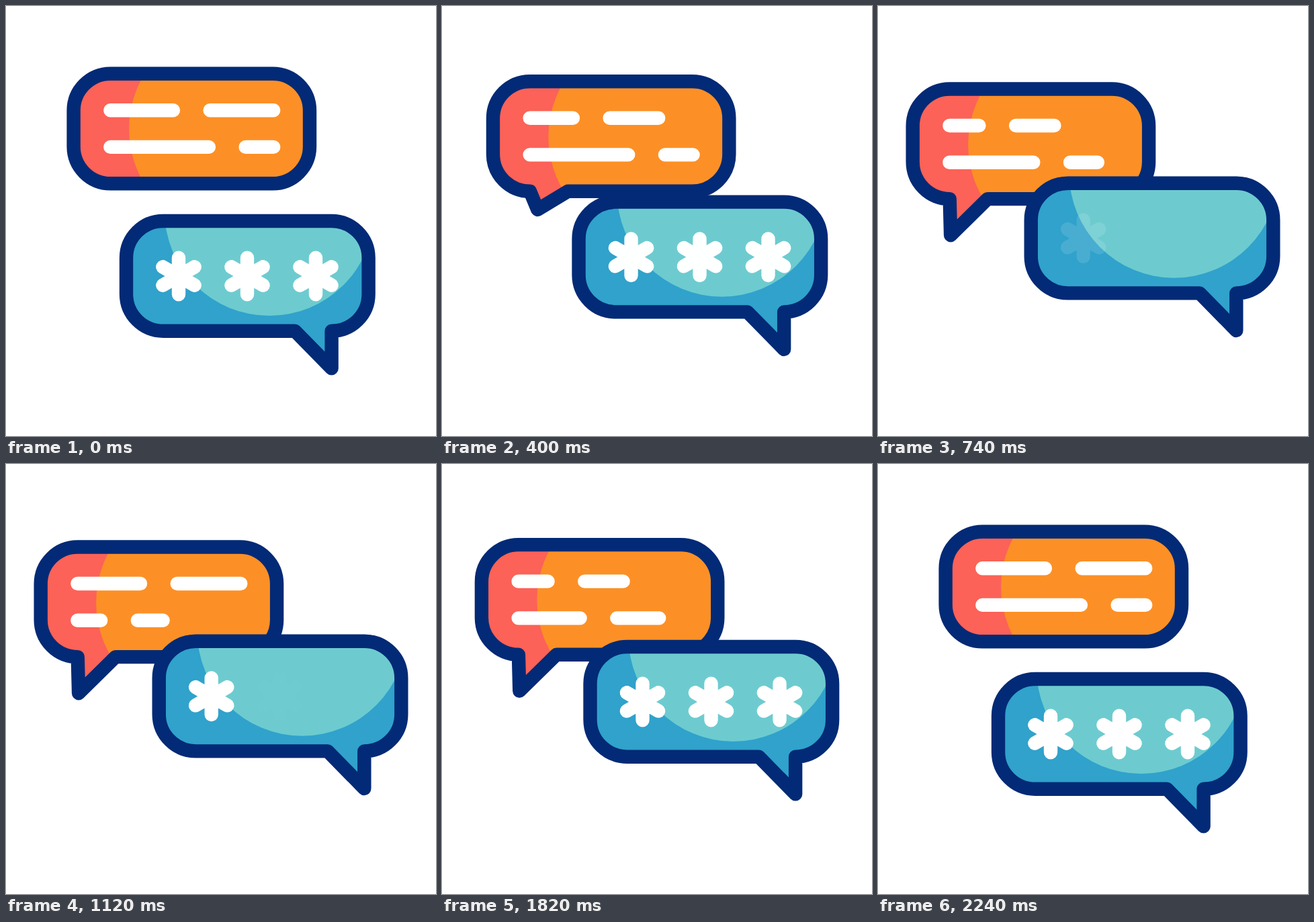
An HTML page for the animation above (2400 ms loop, 640 by 640 pixels).

```html
<!DOCTYPE html>
<html lang="en">
<head>
<meta charset="utf-8">
<title>Chat bubbles</title>
<style>
  html, body { margin: 0; width: 100%; height: 100%; overflow: hidden; background: #fff; }
  svg { display: block; width: 100vw; height: 100vh; }
  .outline { fill: none; stroke: #032a76; stroke-width: 20.4; stroke-linejoin: round; }
  .mark { fill: none; stroke: #fff; stroke-width: 20.4; stroke-linecap: round; }
</style>
</head>
<body>
<svg viewBox="0 0 640 640">
  <defs>
    <clipPath id="messageClip"><path class="messageShape"/></clipPath>
    <clipPath id="replyClip"><path class="replyShape"/></clipPath>
  </defs>
  <g id="message">
    <g clip-path="url(#messageClip)">
      <rect x="90" y="90" width="380" height="250" fill="#fc6257"/>
      <path d="M340 26H480V340H340A157 157 0 0 1 340 26Z" fill="#fc9026"/>
    </g>
    <path class="outline messageShape"/>
    <path class="mark" id="row1"/>
    <path class="mark" id="row2"/>
  </g>
  <g id="reply">
    <g clip-path="url(#replyClip)">
      <rect x="160" y="300" width="400" height="260" fill="#30a2cb"/>
      <circle cx="392" cy="305" r="156" fill="#6dcbcf"/>
    </g>
    <path class="outline replyShape"/>
    <g id="stars"></g>
  </g>
</svg>
<script>
const LOOP = 2400;
const $ = id => document.getElementById(id);
const setPath = (selector, d) =>
  document.querySelectorAll(selector).forEach(el => el.setAttribute('d', d));

// Progress from 0 to 1 between two times, linear or eased.
const ramp = (t, from, to) => Math.min(1, Math.max(0, (t - from) / (to - from)));
const ease = (t, from, to) => {
  const s = ramp(t, from, to);
  return s * s * (3 - 2 * s);
};
const mix = (a, b, s) => a + (b - a) * s;

// Rounded box; the tail is drawn along the bottom edge, right to left.
function bubble(x, y, w, h, tail) {
  const r = 55, arc = (dx, dy) => `a${r} ${r} 0 0 1 ${dx} ${dy}`;
  return `M${x + r} ${y}h${w - 2 * r}${arc(r, r)}v${h - 2 * r}${arc(-r, r)}${tail}` +
    `L${x + r} ${y + h}${arc(-r, -r)}v${2 * r - h}${arc(r, -r)}Z`;
}

function row(y, first, second) {
  const x = 155.3, cap = 20.4, gap = 34.3;
  return `M${x} ${y}h${first - cap}M${x + first + gap} ${y}h${second - cap}`;
}

function asterisk(cx, cy, r) {
  return [0, 1, 2].map(i => {
    const dx = r * Math.sin(i * Math.PI / 3), dy = r * Math.cos(i * Math.PI / 3);
    return `M${cx - dx} ${cy - dy}l${2 * dx} ${2 * dy}`;
  }).join('');
}

setPath('.replyShape', bubble(179, 320, 360.6, 163.7, 'v55.7L430 483.7'));

const stars = [0, 1, 2].map(i => {
  const star = document.createElementNS('http://www.w3.org/2000/svg', 'path');
  star.setAttribute('class', 'mark');
  star.setAttribute('d', asterisk(257 + 102 * i, 402, 27.3));
  return $('stars').appendChild(star);
});

function draw(t) {
  const meet = ease(t, 200, 600) - ease(t, 1700, 2200);
  $('message').setAttribute('transform', `translate(${-48.9 * meet} ${22.8 * meet})`);
  $('reply').setAttribute('transform', `translate(${48.7 * meet} ${-56.3 * meet})`);

  const tail = ease(t, 200, 600) - ease(t, 1960, 2240);
  const tip = `${mix(177, 157, tail)} ${mix(264.3, 318.4, tail)}`;
  setPath('.messageShape', bubble(100.6, 100.7, 351.4, 163.6, `H212L${tip}`));

  // The upper row shortens twice; the lower one shrinks once and regrows in two steps.
  const short = meet - ease(t, 620, 1120) + ease(t, 1120, 1620);
  $('row1').setAttribute('d', row(155.2, mix(114, 55.8, short), mix(115, 71.3, short)));

  const shrink = ease(t, 600, 1100), regrow = ease(t, 1100, 1700), reset = ease(t, 1700, 2200);
  const first = 167 - 112 * shrink + 48 * regrow + 64 * reset;
  const second = 62 - 4 * shrink + 29 * regrow - 25 * reset;
  $('row2').setAttribute('d', row(209.9, first, second));

  stars.forEach((star, i) => {
    const start = 720 + 400 * i;
    star.setAttribute('opacity', 1 - ramp(t, 400, 600) + ramp(t, start, start + 180));
  });
}

function tick() {
  draw(performance.now() % LOOP);
  requestAnimationFrame(tick);
}
tick();
</script>
</body>
</html>
```
